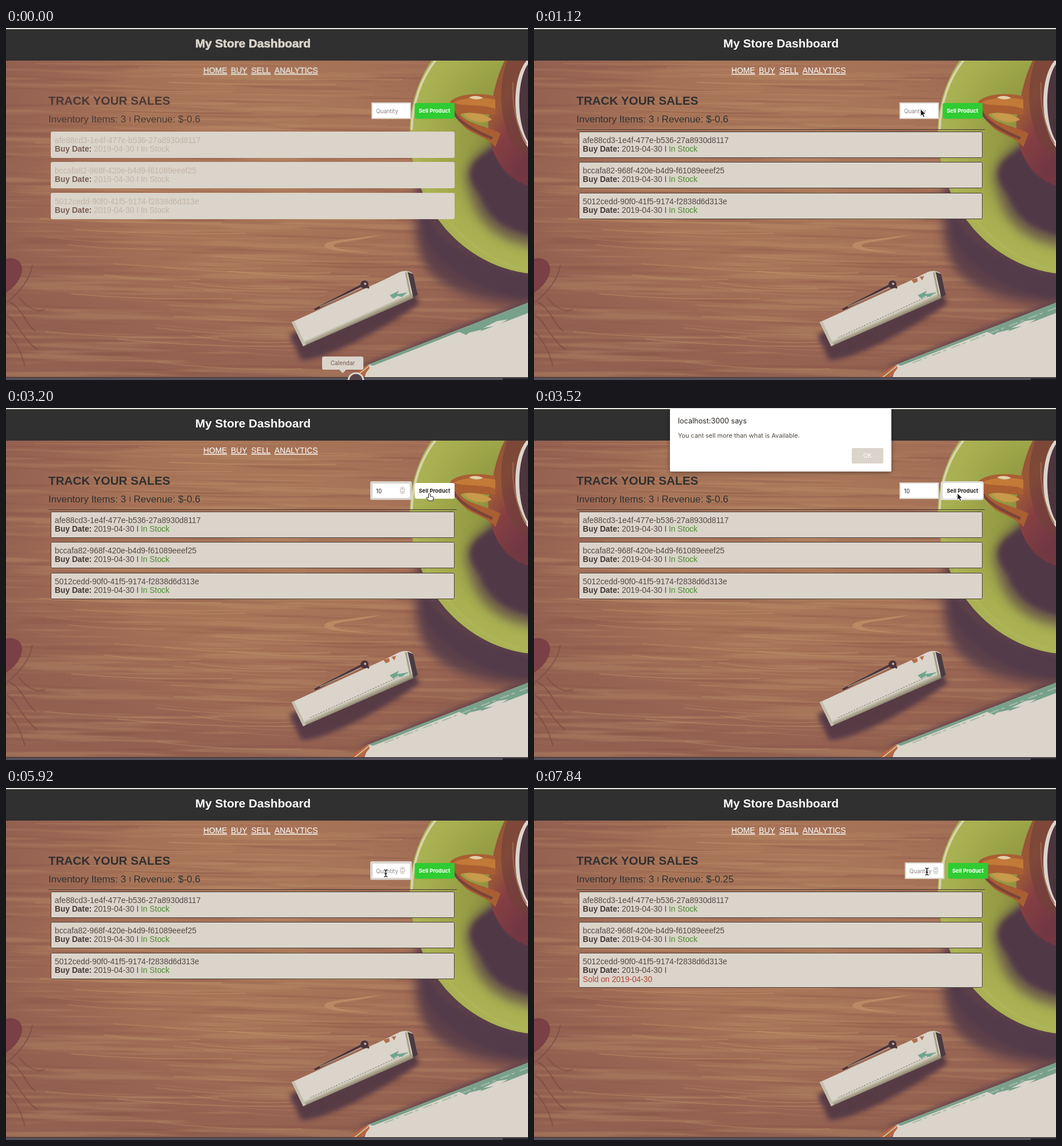
Recreate the animation shown at these times as an HTML page. Size 910x615 px, loop 8000 ms.

```html
<!DOCTYPE html>
<html lang="en">
<head>
<meta charset="utf-8">
<title>My Store Dashboard</title>
<style>
html, body { margin: 0; width: 100%; height: 100%; overflow: hidden; background: #303030; }
svg { display: block; width: 910px; height: 615px; }
text { font-family: "Liberation Sans", Arial, sans-serif; white-space: pre; }
.ui { font-family: Inter, sans-serif; }
.b { font-weight: 700; }
.title { font-size: 20.7px; fill: #fff; }
.nav { font-size: 13.8px; fill: #fff; text-decoration: underline; }
.head { font-size: 20.7px; fill: #303030; }
.stat { font-size: 17px; fill: #303030; }
.card rect { fill: #dad4ca; stroke: #4b403b; }
.card text { font-size: 13.8px; fill: #554b45; }
.card .b { fill: #443a35; }
.card .in { fill: #4c8a31; }
.card .sold { fill: #b04435; }
.rough .title, .rough .nav { fill: #dad4ca; stroke: #dad4ca; stroke-width: .7; }
.rough .head, .rough .stat { fill: #4a3836; }
.rough .card rect { stroke: #dad4ca; }
.rough .card text { fill: #a08672; opacity: .4; }
.rough .card .b { fill: #6f5248; opacity: .9; }
.rough .rule, .rough .fine { display: none; }
</style>
</head>
<body>
<svg id="stage" viewBox="0 0 910 615">
  <defs>
    <radialGradient id="wood" gradientUnits="userSpaceOnUse" cx="450" cy="230" r="520" gradientTransform="matrix(1 0 0 .76 0 55)">
      <stop offset="0" stop-color="#ac7a5b"/><stop offset=".5" stop-color="#a67257"/><stop offset=".85" stop-color="#976352"/><stop offset="1" stop-color="#925f50"/>
    </radialGradient>
    <radialGradient id="plate" gradientUnits="userSpaceOnUse" cx="910" cy="190" r="235">
      <stop offset="0" stop-color="#7b8239"/><stop offset=".5" stop-color="#98a046"/><stop offset=".8" stop-color="#a8b051"/><stop offset="1" stop-color="#abb355"/>
    </radialGradient>
    <linearGradient id="cup" x1="0" y1="0" x2=".45" y2="1">
      <stop offset="0" stop-color="#8d5238"/><stop offset=".4" stop-color="#9c5838"/><stop offset=".65" stop-color="#853e43"/><stop offset="1" stop-color="#713842"/>
    </linearGradient>
    <linearGradient id="edge" gradientUnits="userSpaceOnUse" x1="590" y1="476" x2="609" y2="518">
      <stop offset="0" stop-color="#dad4ca"/><stop offset=".76" stop-color="#dad4ca"/><stop offset=".84" stop-color="#b8b39e"/><stop offset="1" stop-color="#827a64"/>
    </linearGradient>
    <filter id="light" x="0" y="0" width="100%" height="100%" color-interpolation-filters="sRGB">
      <feTurbulence type="fractalNoise" baseFrequency=".003 .085" numOctaves="3" seed="8"/>
      <feColorMatrix values="0 0 0 0 .76  0 0 0 0 .6  0 0 0 0 .43  6 0 0 0 -3.1"/>
    </filter>
    <filter id="dark" x="0" y="0" width="100%" height="100%" color-interpolation-filters="sRGB">
      <feTurbulence type="fractalNoise" baseFrequency=".004 .1" numOctaves="3" seed="21"/>
      <feColorMatrix values="0 0 0 0 .52  0 0 0 0 .31  0 0 0 0 .27  -6 0 0 0 2.7"/>
    </filter>
    <filter id="soft" x="-30%" y="-30%" width="160%" height="160%"><feGaussianBlur stdDeviation="9"/></filter>
    <filter id="haze" x="-30%" y="-30%" width="160%" height="160%"><feGaussianBlur stdDeviation="4"/></filter>
    <filter id="drop" x="-10%" y="-10%" width="120%" height="130%"><feDropShadow dx="0" dy="2" stdDeviation="4" flood-opacity=".4"/></filter>
    <clipPath id="dish"><path d="M704 180A231 225 0 0 1 935-45V430A231 250 0 0 1 704 180"/></clipPath>
  </defs>

  <g id="photo">
    <rect width="910" height="615" fill="url(#wood)"/>
    <g transform="rotate(1)">
      <rect x="-20" y="-40" width="960" height="680" filter="url(#light)" opacity=".3"/>
      <rect x="-20" y="-40" width="960" height="680" filter="url(#dark)" opacity=".3"/>
    </g>
    <g id="grain" fill="none" stroke="#bf9468"></g>
    <path d="M655 361C605 369 553 370 555 381C560 392 612 390 650 396C610 388 574 389 571 380C573 373 620 372 655 361" fill="#bb8963"/>
    <path d="M0 403C14 400 27 405 28 420C28 440 10 457 0 462Z" fill="#7b3f46"/>
    <g fill="none" stroke="#7f4a46" stroke-width="2" opacity=".75">
      <path d="M0 480C22 464 42 440 46 414M5 478C30 490 35 520 52 530M0 500C18 510 30 545 55 562M22 470Q45 500 68 492M0 530Q22 550 33 590"/>
    </g>
    <path d="M716 270C712 320 706 385 738 425C772 462 830 480 920 486V400L760 250Z" fill="#5b3f49" filter="url(#soft)"/>
    <path d="M718 275C722 340 770 405 920 436V474C840 468 762 425 730 365Z" fill="#533b48" filter="url(#haze)"/>

    <path d="M704 180A231 225 0 0 1 935-45V430A231 250 0 0 1 704 180" fill="url(#plate)"/>
    <g clip-path="url(#dish)">
      <path d="M858 192L822 220C802 238 795 258 808 287C818 332 848 374 930 384V190Z" fill="#655149" opacity=".85" filter="url(#soft)"/>
      <path d="M860 200L822 228C803 248 806 265 826 292C838 328 866 356 930 366V210Z" fill="#513946" filter="url(#haze)"/>
      <path d="M710 200C718 285 790 396 910 424" fill="none" stroke="#b1b75a" stroke-width="4" opacity=".7"/>
    </g>
    <path d="M707 178C709 130 722 90 749 56" fill="none" stroke="#d8d4ad" stroke-width="4"/>

    <path d="M870 56C854 85 850 118 841 157C838 191 852 260 912 276V56Z" fill="url(#cup)"/>
    <path d="M874 57C856 105 861 162 883 202L910 225V57Z" fill="#70413a" opacity=".65"/>
    <path d="M852 119C820 112 787 116 775 128C772 144 788 164 805 178C824 189 840 193 853 208L862 184C835 170 803 167 792 151C806 144 830 153 853 151Z" fill="#a95f32"/>
    <path d="M853 125C825 120 795 121 780 131C800 137 831 133 853 141Z" fill="#c37a38"/>
    <path d="M798 150C816 146 837 151 847 160C830 170 806 162 798 150" fill="#c89a4c"/>
    <path d="M780 146C789 165 815 179 848 193" fill="none" stroke="#7b433b" stroke-width="5"/>
    <path d="M807 121Q820 116 832 122Q820 128 807 121" fill="#e1d2ae"/>
    <path d="M915 50C878 77 880 180 915 214Z" fill="#dad4ca"/>
    <path d="M915 57C888 83 888 174 915 205Z" fill="#4d353f"/>
    <path d="M884 95C882 135 890 172 907 202" fill="none" stroke="#9c6a50" stroke-width="2"/>

    <path d="M494 535L514 580C550 584 660 526 721 481L707 455Z" fill="#573b45" filter="url(#haze)"/>
    <path d="M498 514L659 440L685 427Q700 421 710 430L718 465L708 473L518 556Z" fill="url(#edge)"/>
    <path d="M498 514L518 556L523 554L502 512Z" fill="#c3bfad"/>
    <path d="M700 426L710 430L718 466L710 471Z" fill="#4b3b42"/>
    <path d="M697 427L706 471" stroke="#a1a087" stroke-width="3"/>
    <path d="M538 492L621 449L633 454" fill="none" stroke="#4a343a" stroke-width="3.5"/>
    <path d="M547 487L619 454" stroke="#bdb3a4" stroke-width="1.3"/>
    <circle cx="625" cy="448" r="7" fill="#4a353d"/><circle cx="626" cy="447" r="2" fill="#c3b7a9"/>
    <g class="fine">
      <path d="M530 541L706 460" stroke="#8b8784" stroke-width="1.2" stroke-dasharray="3 2"/>
      <path d="M658 440l10-3 1 6-7 3zm14-5 8-2-3 8z" fill="#b46e4b"/>
    </g>
    <path d="M669 467l16-8-3 6 18-3-10 8-7-2-8 5z" fill="#6fa68e"/>

    <path d="M616 591L910 474V490L640 595Z" fill="#65454b" filter="url(#haze)"/>
    <path d="M632 588L910 480V611H625Z" fill="#dad4ca"/>
    <path d="M632 588L910 480V498L806 538L790 531L640 590Z" fill="#78a18a"/>
    <path class="fine" d="M660 585L910 489" stroke="#a8bba5" stroke-width="2" stroke-dasharray="17 4 6 9"/>
    <path d="M792 543l16-11 22-5-10 9zM832 524l24-12 19-3-18 11z" fill="#dad4ca"/>
    <path d="M597 611L631 587L634 594L621 611Z" fill="#b56840"/>
    <path d="M607 611L632 591" stroke="#d3bea4" stroke-width="2"/>
  </g>

  <rect width="910" height="57" fill="#303030"/>
  <rect width="910" height="2" fill="#ece9e4"/>
  <rect y="611" width="910" height="4" fill="#55515a"/><rect y="610" width="910" height="1" fill="#3b3034"/>
  <rect x="866" y="612" width="44" height="3" fill="#211f25"/>
  <text class="title b" x="330" y="34">My Store Dashboard</text>
  <text class="nav" x="344" y="79">HOME</text><text class="nav" x="392" y="79">BUY</text>
  <text class="nav" x="427.5" y="79">SELL</text><text class="nav" x="468" y="79">ANALYTICS</text>
  <text class="head b" x="74" y="134">TRACK YOUR SALES</text>
  <text class="stat" x="74" y="165">Inventory Items: 3</text>
  <text class="stat" x="214.5" y="164" style="font-size:12px">I</text>
  <text class="stat" x="222.5" y="165" id="revenue"></text>
  <path class="rule" d="M74 177.5H786" stroke="#493a36"/>
  <g id="cards"></g>

  <g id="form">
    <rect id="ring" x="635" y="128" width="72.5" height="32.5" rx="3" fill="#d9d6d3"/>
    <rect x="638" y="131" width="67" height="27" fill="#fff" stroke="#dad4ca" stroke-width="2"/>
    <text id="field" class="ui" x="645" y="148.5" font-size="9.7"></text>
    <g id="spin" fill="none" stroke="#77716d"><rect x="687.5" y="138" width="7" height="12" rx="3.5" stroke="#bbb5ae"/><path d="M689.3 142.5l1.7-2 1.7 2M689.3 145.5l1.7 2 1.7-2"/></g>
    <rect id="caret" x="645" y="139" width="1" height="11" fill="#222"/>
    <rect id="glow" x="709" y="128" width="75" height="33" rx="4" fill="#dfdcd8"/>
    <rect id="button" x="712.5" y="131" width="69.5" height="27.5" rx="3"/>
    <text id="label" class="ui" x="747" y="148" text-anchor="middle" font-size="9.4" font-weight="650">Sell Product</text>
  </g>

  <g id="dialog">
    <path d="M237 1H623V109Q623 111 621 111H239Q237 111 237 109Z" fill="#fff" filter="url(#drop)"/>
    <text class="ui" x="251" y="26.5" font-size="12.6" fill="#28231f">localhost:3000 says</text>
    <text class="ui" x="251" y="51.5" font-size="10.9" fill="#504842">You cant sell more than what is Available.</text>
    <rect x="554" y="70" width="55" height="27" rx="2" fill="#dad4ca"/>
    <text class="ui" x="581.5" y="87" font-size="10.5" fill="#fff" text-anchor="middle">OK</text>
  </g>
  <g id="tip">
    <path d="M554 574H620Q623 574 623 577V594Q623 597 620 597H593L587 603L581 597H554Q551 597 551 594V577Q551 574 554 574" fill="#dad4ca"/>
    <text class="ui" x="587" y="589" font-size="10" fill="#75594f" text-anchor="middle">Calendar</text>
    <circle cx="610" cy="616" r="13" fill="#55434a" stroke="#dad4ca" stroke-width="3"/>
  </g>
  <g id="cursor">
    <path id="arrow" d="M0 0V12L2.8 9.4 4.8 14 7 13 5 8.6H9Z" fill="#111" stroke="#fff" stroke-width=".9"/>
    <path id="hand" d="M-1.5 1Q0-1 1.5 1V5L6 6Q8 7 7.5 9L6 13H-1L-5 8Q-4 6-1.5 8Z" fill="#fff" stroke="#222"/>
    <path id="beam" d="M-3-6Q0-6 0-4Q0-6 3-6M0-4V5M-3 6Q0 6 0 4Q0 6 3 6M-2 1H2" fill="none" stroke="#222" stroke-width="1.3"/>
  </g>
</svg>
<script>
const $ = id => document.getElementById(id);
const show = (id, on) => { $(id).style.display = on ? '' : 'none'; };
const LOOP = 8000, STEP = 160;

let seed = 7;
const rnd = () => (seed = seed * 16807 % 2147483647) / 2147483647;
// Long grain lines, level at the top and sagging further down
$('grain').innerHTML = Array.from({ length: 80 }, (_, i) => {
  const x = 50 + rnd() * 340, y = 62 + i * 6.6, w = 150 + rnd() * 220;
  const sag = y / 45 + rnd() * 5;
  return `<path d="M${x} ${y}q${w * .5} ${sag} ${w} ${sag * .7}" stroke-width="${.7 + rnd() * 1.3}" opacity="${.15 + rnd() * .4}"/>`;
}).join('');

const ids = ['afe88cd3-1e4f-477e-b536-27a8930d8117', 'bccafa82-968f-420e-b4d9-f61089eeef25', '5012cedd-90f0-41f5-9174-f2838d6d313e'];
$('cards').innerHTML = ids.map((id, i) => `<g class="card" transform="translate(0 ${Math.round(i * 53.4)})">
  <rect x="78.5" y="181.5" width="703" height="45" rx="2"/>
  <text x="85" y="201">${id}</text><text class="b" x="85" y="216">Buy Date:</text>
  <text x="153" y="216">2019-04-30 I</text><text class="in" x="235" y="216">In Stock</text>
  <text class="sold" x="85" y="232" display="none">Sold on 2019-04-30</text></g>`).join('');
const last = $('cards').lastElementChild;

// time, x, y of the pointer
const path = [[160, 610, 600], [480, 640, 420], [800, 668, 200], [1120, 674, 142], [1440, 672, 146], [1600, 670, 147],
  [2720, 670, 147], [3200, 738, 149], [3680, 738, 149], [4160, 583, 84], [4640, 583, 84], [5440, 662, 149],
  [6240, 662, 149], [6720, 738, 149], [7360, 738, 149], [7840, 685, 146]];
const kinds = [[0, 'arrow'], [1440, 'beam'], [3040, 'arrow'], [3200, 'hand'], [3520, 'arrow'], [5280, 'beam'],
  [6560, 'arrow'], [6720, 'hand'], [7680, 'arrow'], [7840, 'beam']];

function pointer(t) {
  const i = path.findIndex(p => p[0] > t);
  if (i < 1) return (i ? path.at(-1) : path[0]).slice(1);
  const [a, b] = [path[i - 1], path[i]], k = (t - a[0]) / (b[0] - a[0]);
  return [a[1] + (b[1] - a[1]) * k, a[2] + (b[2] - a[2]) * k];
}

function draw(t) {
  const on = (...spans) => spans.some(([a, b]) => t >= a && t < b);
  const rough = t < 160, sold = t >= 7040;
  $('stage').classList.toggle('rough', rough);
  show('tip', rough);

  const kind = kinds.findLast(k => k[0] <= t)[1];
  ['arrow', 'hand', 'beam'].forEach(k => show(k, k === kind));
  show('cursor', !rough);
  $('cursor').setAttribute('transform', `translate(${pointer(t)})`);

  const value = on([2560, 4640]) ? '10' : on([6240, 7040]) ? '1' : '';
  const focus = on([1600, 3360], [5440, 6880]);
  $('field').textContent = value || 'Quantity';
  $('field').setAttribute('fill', value ? '#222' : '#8b8581');
  show('ring', focus);
  show('spin', focus || kind === 'beam');
  show('caret', on([1600, 2080], [2560, 3040], [5440, 5920], [6240, 6720]));
  $('caret').setAttribute('x', 645 + value.length * 6);

  const hover = on([3200, 4800], [6720, 7680]);
  show('glow', on([3360, 4640], [6880, 7040]));
  $('button').setAttribute('fill', hover ? '#fff' : '#2fcc33');
  $('label').setAttribute('fill', hover ? '#292421' : '#fff');
  $('form').setAttribute('transform', `translate(${sold ? 9.5 : 0} 0)`);

  show('dialog', on([3360, 4800]));
  const closing = t >= 4640;
  $('dialog').setAttribute('opacity', closing ? .08 : t < 3520 ? .55 : 1);
  $('dialog').setAttribute('transform', closing ? 'translate(12.9 -16) scale(.97)' : '');

  $('revenue').textContent = 'Revenue: $-0.' + (sold ? '25' : '6');
  last.querySelector('rect').setAttribute('height', sold ? 60 : 45);
  last.querySelector('.in').setAttribute('display', sold ? 'none' : 'inline');
  last.querySelector('.sold').setAttribute('display', sold ? 'inline' : 'none');
}

const start = performance.now();
let shown = -1;
function tick() {
  const t = Math.floor((performance.now() - start) % LOOP / STEP) * STEP;
  if (t !== shown) draw(shown = t);
  requestAnimationFrame(tick);
}
tick();
</script>
</body>
</html>
```
